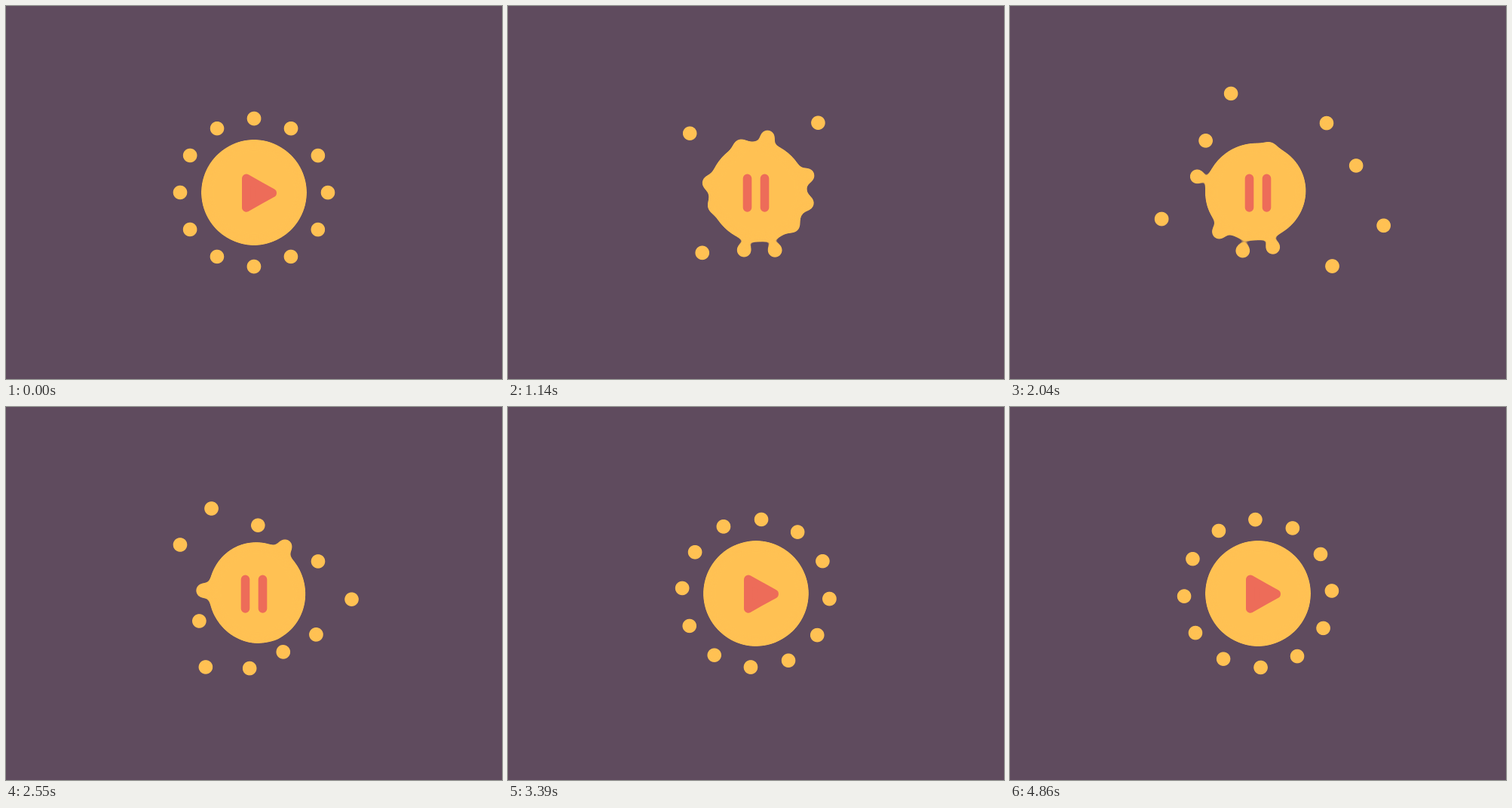
An HTML page for the animation above (4.89 s loop, 658 by 494 pixels).

```html
<!DOCTYPE html>
<html lang="en">
<head>
<meta charset="utf-8">
<title>Gooey play button</title>
<style>
  html, body { margin: 0; width: 100%; height: 100%; overflow: hidden; background: #5f4b5e; }
  svg { display: block; width: 658px; height: 494px; }
</style>
</head>
<body>
<svg viewBox="0 0 658 494">
  <defs>
    <filter id="goo" filterUnits="userSpaceOnUse" x="0" y="0" width="658" height="494" color-interpolation-filters="sRGB">
      <feGaussianBlur stdDeviation="6"/>
      <feColorMatrix values="1 0 0 0 0  0 1 0 0 0  0 0 1 0 0  0 0 0 20 -6"/>
    </filter>
  </defs>
  <g id="body" fill="#ffc153" filter="url(#goo)"><ellipse id="blob"/></g>
  <path id="icon" fill="#ed6c59" stroke="#ed6c59" stroke-width="11.6" stroke-linejoin="round"/>
</svg>
<script>
const LOOP = 4890, CX = 329, CY = 247;
const PAUSE = 330, PLAY = 3040;
const SPIN = 36.6;   // degrees per second
const ORBIT = 98, BLOB_R = 67.5;

// While paused each dot swings in and out: [reach in px, radians per second]
const SWINGS = [
  [37, 0.95], [90, 4.24], [-43, 2.95], [-36, 1.43],
  [19, 6.27], [-26, 1.1], [37, 8.05], [-42, 1.63],
  [-35, 1.83], [39, 8.4], [-42, 1.15], [-32, 2.87]
];

const get = id => document.getElementById(id);
const set = (el, attrs) => { for (const k in attrs) el.setAttribute(k, attrs[k]); };
const progress = (t, from, span) => Math.min(1, Math.max(0, (t - from) / span));
const smooth = u => u * u * (3 - 2 * u);
const easeOut = u => 1 - (1 - u) ** 3;

const body = get('body'), blob = get('blob'), icon = get('icon');
const dots = SWINGS.map(([reach, speed]) => {
  const el = document.createElementNS('http://www.w3.org/2000/svg', 'circle');
  el.setAttribute('r', 8.7);
  body.appendChild(el);
  return { el, reach, speed };
});

// Two quads: halves of the triangle when p = 0, bars when p = 1
function iconPath(p) {
  const mix = (a, b) => a + (b - a) * p;
  const quad = (x1, x2, h1, h2, bar) => {
    const a = mix(x1, bar), b = mix(x2, bar), m = mix(h1, 19.3), n = mix(h2, 19.3), y = 247.6;
    return `M${a} ${y - m}L${b} ${y - n}L${b} ${y + n}L${a} ${y + m}Z`;
  };
  return quad(318.8, 336, 19.3, 9.6, 317.5) + quad(336, 353.2, 9.6, 0.1, 340.5);
}

function draw() {
  const t = performance.now() % LOOP;
  const since = (t - PAUSE) / 1000;
  const unrest = smooth(progress(t, PAUSE, 670)) - smooth(progress(t, PLAY, 380));

  dots.forEach(({ el, reach, speed }, i) => {
    const a = (i * 30 + t / 1000 * SPIN) * Math.PI / 180;
    const r = ORBIT + unrest * reach * Math.sin(speed * since);
    set(el, { cx: CX + r * Math.sin(a), cy: CY - r * Math.cos(a) });
  });

  // The body shrinks, sways sideways and stretches with the sway
  const sway = unrest * Math.sin(3.255 * since);
  const x = CX + 5 * sway, y = CY - unrest, r = BLOB_R - 4.3 * unrest;
  set(blob, {
    cx: x, cy: y, rx: r - 2 * sway, ry: r + 2 * sway,
    transform: `rotate(${-15 * unrest} ${x} ${y})`
  });

  set(icon, { d: iconPath(easeOut(progress(t, PAUSE, 370)) - easeOut(progress(t, PLAY, 440))) });
  requestAnimationFrame(draw);
}
draw();
</script>
</body>
</html>
```
